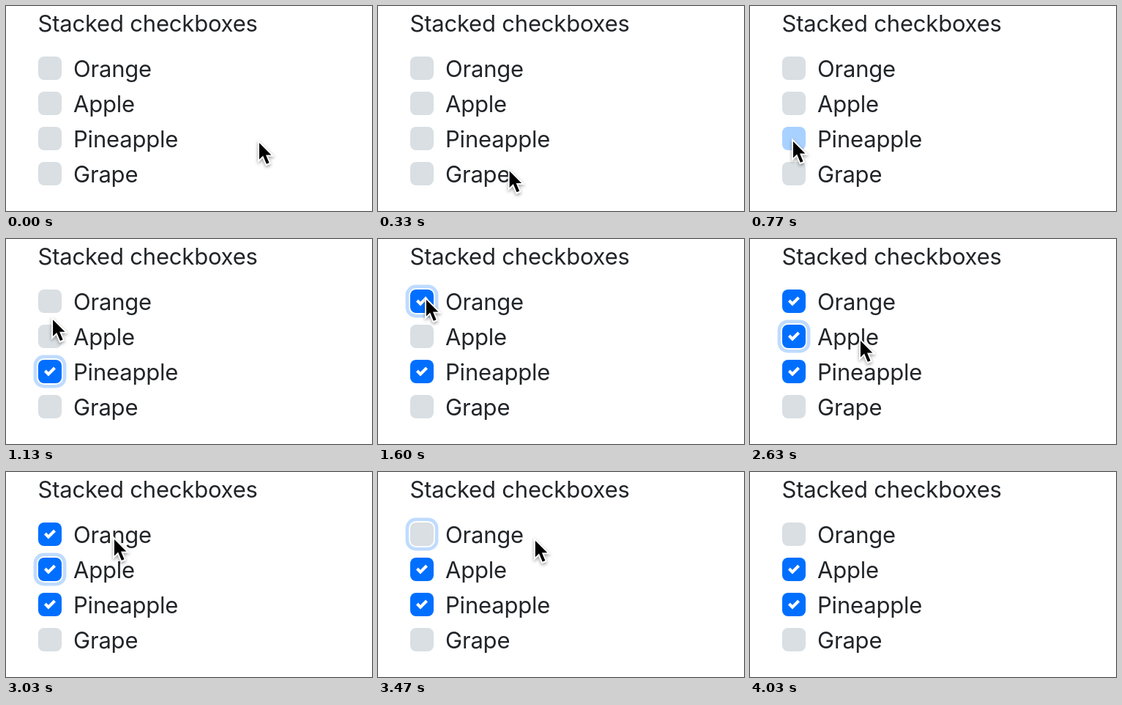
Recreate the animation shown at these times as an HTML page. Size 500x280 px, loop 4.9 s.

```html
<!DOCTYPE html>
<html lang="en">
<head>
<meta charset="utf-8">
<title>Stacked checkboxes</title>
<style>
  html, body { margin: 0; width: 100%; height: 100%; overflow: hidden; background: #fff; }
  svg { display: block; }
  text {
    font: 400 31px Inter, Roboto, sans-serif;
    font-optical-sizing: none;
    letter-spacing: -0.2px;
    fill: #212529;
  }
  .ring { fill: #bfdbff; }
  .gap, .tick { fill: #fff; }
  #cursor { filter: drop-shadow(0 2px 2px rgba(0, 0, 0, .38)); }
</style>
</head>
<body>
<svg width="500" height="280" viewBox="0 0 500 280">
  <text x="43.5" y="35">Stacked checkboxes</text>
  <g id="rows"></g>
  <g id="cursor">
    <g transform="scale(2) translate(-9.2 -7.3)">
      <path fill="#fff" d="M8.2 20.9V4.9L19.8 16.5H13L12.6 16.6ZM17.3 21.6L13.7 23.1 9 12 12.7 10.5Z"/>
      <path d="M9.2 7.3V18.5L12.2 15.6 12.6 15.5H17.4Z"/>
      <rect x="12.5" y="13.6" width="2" height="8" transform="rotate(-22.8 13.5 17.6)"/>
    </g>
  </g>
</svg>
<script>
const LOOP = 4900, HOLD = 90, BLUR = 4030;
const OFF = '#d9dfe3', PRESSED = '#a9d1ff', ON = '#006fff';
const TICK = 'M6.564.75l-3.59 3.612-1.538-1.55L0 4.26 2.974 7.25 8 2.193z';

const cursor = document.getElementById('cursor');
const rows = ['Orange', 'Apple', 'Pineapple', 'Grape'].map((label, i) => {
  const g = document.createElementNS('http://www.w3.org/2000/svg', 'g');
  g.setAttribute('transform', `translate(44 ${69 + 48 * i})`);
  g.innerHTML = `
    <g class="focus">
      <rect class="ring" x="-6.4" y="-6.4" width="44.8" height="44.8" rx="14"/>
      <rect class="gap" x="-2" y="-2" width="36" height="36" rx="10"/>
    </g>
    <rect class="box" width="32" height="32" rx="8"/>
    <path class="tick" transform="translate(8 8) scale(2)" d="${TICK}"/>
    <text x="48" y="28.3">${label}</text>`;
  document.getElementById('rows').append(g);
  const part = name => g.querySelector('.' + name);
  return { focus: part('focus'), box: part('box'), tick: part('tick') };
});

// A click presses a row, then toggles and focuses it on release.
const clicks = [
  { row: 2, down: 770 },
  { row: 0, down: 1390 },
  { row: 1, down: 2200 },
  { row: 0, down: 3200 },
];

// The cursor glides to each stop in turn; sag bends the path downwards.
const start = { x: 346, y: 187 };
const glides = [
  { leave: 30, arrive: 600, x: 59, y: 185, sag: 41 },
  { leave: 840, arrive: 1330, x: 66, y: 83 },
  { leave: 1580, arrive: 2030, x: 66, y: 135 },
  { leave: 2300, arrive: 2630, x: 151, y: 139 },
  { leave: 2730, arrive: 3030, x: 148, y: 92 },
  { leave: 3300, arrive: 3900, x: 870, y: 112 },
];

const easeInOut = u => u < .5 ? 4 * u ** 3 : 1 - 4 * (1 - u) ** 3;
const clamp = u => Math.min(1, Math.max(0, u));

function cursorAt(t) {
  let { x, y } = start;
  for (const { leave, arrive, sag = 0, ...stop } of glides) {
    const u = easeInOut(clamp((t - leave) / (arrive - leave)));
    x += (stop.x - x) * u;
    y += (stop.y - y) * u + sag * Math.sin(Math.PI * u);
  }
  return [x, y];
}

function render(t) {
  const last = clicks.findLast(c => t >= c.down);
  rows.forEach((row, i) => {
    const checked = clicks.filter(c => c.row === i && t >= c.down + HOLD).length % 2 === 1;
    const active = last?.row === i;
    const pressed = active && t < last.down + HOLD;
    const focused = active && !pressed && t < BLUR;
    row.box.setAttribute('fill', pressed ? PRESSED : checked ? ON : OFF);
    row.tick.setAttribute('visibility', checked ? 'visible' : 'hidden');
    row.focus.setAttribute('visibility', focused ? 'visible' : 'hidden');
  });
  cursor.setAttribute('transform', `translate(${cursorAt(t)})`);
}

const origin = performance.now();
function frame() {
  render((performance.now() - origin) % LOOP);
  requestAnimationFrame(frame);
}
frame();
</script>
</body>
</html>
```
